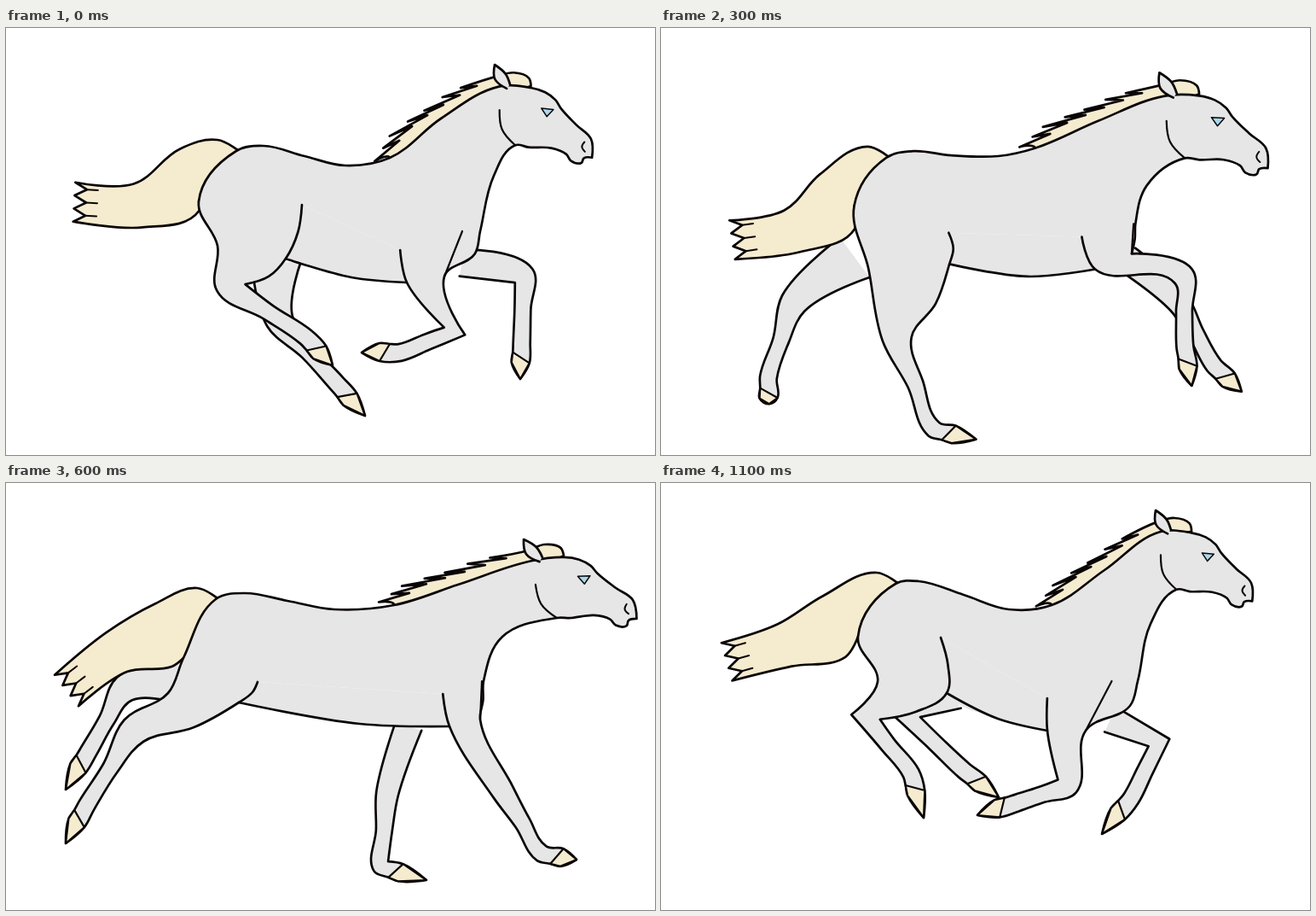
Write an HTML page with a canvas that moves like this. It is 761 px wide and 500 px high and loops after 1200 ms.

```html
<!DOCTYPE html>
<html lang="en">
<head>
<meta charset="utf-8">
<title>Galloping horse</title>
<style>
html, body { margin: 0; width: 100%; height: 100%; overflow: hidden; background: #fff; }
canvas { display: block; }
</style>
</head>
<body>
<canvas id="stage" width="761" height="500"></canvas>
<script>
const ctx = document.getElementById('stage').getContext('2d');
const INK = '#0a0505', COAT = '#e6e6e6', CREAM = '#f5ebcf', EYE = '#a9d8ee';
const STEP = 100, CYCLE = 12;

// Key joints of the gallop; `at` is the step in the cycle.
// head: ear tip, nose.  trunk: buttock, dock, croup, loin, back, withers, crest,
// throat, chest, forearm, elbow, belly, flank, stifle.  tail: spine.
// Legs: upper joint (forearm and elbow serve the near foreleg), knee or hock, coronet, toe.
const poses = [
  { at: 0, head: '573,43 686,130',
    trunk: '226,203 270,144 302,138 350,150 398,161 450,152 510,106 572,173 556,238 514,291 470,298 405,292 328,270 347,207',
    tail: '215,178 155,208 85,204',
    nearHind: '248,255 264,304 364,375 383,395', farHind: '317,275 321,343 400,430 421,454',
    nearFore: '526,355 444,380 417,380', farFore: '535,275 607,290 604,386 603,411' },
  { at: 2, head: '576,42 699,130',
    trunk: '232,195 272,144 300,139 340,145 390,149 440,141 508,109 569,182 556,235 543,269 497,287 430,291 357,277 353,228',
    tail: '212,198 155,228 90,229',
    nearHind: '260,268 332,362 419,463 447,473', farHind: '254,268 195,333 223,462 250,473',
    nearFore: '592,300 561,395 556,417', farFore: '555,262 624,282 665,373 676,396' },
  { at: 4, head: '594,63 720,150',
    trunk: '219,220 255,157 290,147 340,152 400,152 440,142 520,109 572,185 557,225 557,264 518,280 425,290 311,273 318,247',
    tail: '200,203 150,240 85,260',
    nearHind: '221,288 206,352 231,465 260,474', farHind: '208,266 132,305 56,382 30,400',
    nearFore: '620,296 658,392 671,419', farFore: '527,280 573,364 629,445 656,458' },
  { at: 6, head: '607,66 735,137',
    trunk: '208,205 246,136 280,129 330,138 385,148 455,143 530,119 582,180 560,232 556,277 520,285 415,282 273,257 295,233',
    tail: '185,178 130,198 75,240',
    nearHind: '190,246 150,290 86,393 70,422', farHind: '205,232 139,241 88,329 70,359',
    nearFore: '583,362 646,437 669,441', farFore: '472,285 447,364 457,454 493,465' },
  { at: 8, head: '600,56 725,130',
    trunk: '216,185 256,117 290,111 345,128 405,149 462,148 530,116 596,165 552,235 515,291 468,297 385,276 297,240 309,193',
    tail: '185,165 125,180 78,218',
    nearHind: '217,218 168,237 120,339 101,367', farHind: '228,232 200,232 190,334 188,371',
    nearFore: '474,352 470,456 495,465', farFore: '455,290 425,352 348,388 319,401' },
  { at: 10, head: '581,39 703,122',
    trunk: '222,185 266,117 292,114 345,130 397,151 458,149 522,106 582,172 553,245 492,299 443,295 380,272 320,243 321,181',
    tail: '195,160 140,182 68,194',
    nearHind: '239,233 205,258 230,362 228,396', farHind: '290,235 259,266 309,363 325,387',
    nearFore: '452,360 368,404 345,424', farFore: '510,290 519,344 437,393 408,400' },
  { at: 11, head: '580,32 692,117',
    trunk: '231,180 275,118 302,115 355,131 408,148 458,143 520,102 574,165 559,232 498,290 453,290 395,276 335,246 328,181',
    tail: '203,168 145,190 82,208',
    nearHind: '254,233 240,274 298,357 308,392', farHind: '335,240 288,273 370,348 396,368',
    nearFore: '476,355 400,380 371,389', farFore: '527,277 584,304 540,383 517,411' }
];

// The head is rigid: drawn once, then placed by its ear tip and nose.
const head = {
  anchor: '576,42 699,130',
  outline: '582,69 622,69 640,74 653,83 660,93 680,113 699,130 701,153 691,154 688,160 675,158 669,150 650,143 622,143 605,141',
  ear: '592,71 577,60 576,42 590,53 596,66',
  forelock: '580,56 600,51 619,57 622,67 600,76',
  jaw: '584,98 588,122 605,141',
  eye: '636,94 651,95 643,104',
  nostril: '691,134 688,140 692,146'
};

const points = text => text.split(' ').map(p => p.split(',').map(Number));
const parts = Object.keys(poses[0]).filter(k => k !== 'at');
for (const pose of poses) for (const k of parts) pose[k] = points(pose[k]);
for (const k in head) head[k] = points(head[k]);

const add = (p, q, s = 1) => [p[0] + q[0] * s, p[1] + q[1] * s];
const sub = (p, q) => add(p, q, -1);
const mix = (p, q, t = 0.5) => add(p, sub(q, p), t);
const unit = v => { const d = Math.hypot(...v) || 1; return [v[0] / d, v[1] / d]; };
const toward = (p, q) => unit(sub(q, p));
const turn = v => [-v[1], v[0]];
// Direction at q on the way from p to r.
const through = (p, q, r) => unit(add(toward(p, q), toward(q, r)));
// The two edges of a limb at p.
const edges = (p, dir, w) => [add(p, turn(dir), w), add(p, turn(dir), -w)];

function seeded(seed) {
  return () => (seed = seed * 16807 % 2147483647) / 2147483647;
}

// Cubic interpolation between key poses, wrapping round the cycle.
function poseAt(step) {
  const n = poses.length;
  const i = poses.findLastIndex(p => p.at <= step);
  const key = j => poses[(j + n) % n];
  const when = j => key(j).at + CYCLE * Math.floor(j / n);
  const h = when(i + 1) - when(i), u = (step - when(i)) / h;
  const out = {};
  for (const k of parts) {
    out[k] = key(i)[k].map((pt, v) => pt.map((a, c) => {
      const val = j => key(j)[k][v][c];
      const slope = j => (val(j + 1) - val(j - 1)) / (when(j + 1) - when(j - 1)) * h;
      const b = val(i + 1), m = slope(i), q = slope(i + 1);
      return a + u * (m + u * (3 * (b - a) - 2 * m - q + u * (2 * (a - b) + m + q)));
    }));
  }
  return out;
}

// Outline of a lower leg: down the back edge, round the hoof, up the front edge.
function lowerLeg(from, [knee, coronet, toe], width) {
  const u = toward(coronet, toe), n = turn(u);
  const fetlock = add(coronet, u, -18);
  const [kneeB, kneeF] = edges(knee, through(from, knee, fetlock), width);
  const [shinB, shinF] = edges(mix(knee, fetlock), toward(knee, fetlock), 9.5);
  const [fetB, fetF] = edges(fetlock, through(knee, fetlock, coronet), 10);
  const hoofAt = (along, across) => add(add(coronet, u, along), n, across);
  const hoof = [hoofAt(-6, 10), hoofAt(6, 11), toe, hoofAt(6, -10)];
  return { hoof, path: [kneeB, shinB, fetB, ...hoof, fetF, shinF, kneeF] };
}

function farLeg([top, ...joints], topWidth, width) {
  const { hoof, path } = lowerLeg(top, joints, width);
  const [back, front] = edges(top, toward(top, joints[0]), topWidth);
  return { hoof, path: [back, ...path, front] };
}

function tailShape([p1, p2, p3], buttock, dock) {
  const dir = toward(p2, p3);
  const [t1, b1] = edges(p1, through(mix(dock, buttock), p1, p2), 38);
  const [t2, b2] = edges(p2, through(p1, p2, p3), 26);
  const [t3, b3] = edges(p3, dir, 23);
  const tip = [], wisps = [];
  for (let i = 0; i <= 6; i++) {
    const p = add(mix(t3, b3, i / 6), dir, i % 2 ? -9 : 5);
    tip.push(p);
    if (i % 2) wisps.push([p, add(p, dir, -13)]);
  }
  const hump = add(dock, [-22, -13]);
  return { path: [add(dock, [6, 2]), hump, t1, t2, ...tip, b2, b1, buttock], wisps };
}

// Swept-back tufts along the crest, ending in the forelock.
function maneShape(withers, crest, poll, forelock) {
  const rand = seeded(11), tufts = 7, path = [withers];
  const bend = add(add(crest, crest), mix(withers, poll), -1);
  for (let i = 0; i < tufts; i++) {
    const t = i / tufts;
    const a = mix(withers, bend, t), b = mix(bend, poll, t);
    const dir = toward(a, b), out = turn(dir).map(c => -c);
    const root = add(mix(a, b, t), out, Math.min(12, 2 + i * 6));
    const tip = add(add(root, dir, -16 - 14 * rand()), out, 5 + 4 * rand());
    path.push(root, tip);
  }
  return [...path, ...forelock, add(crest, [15, 12])];
}

function placeHead([ear, nose]) {
  const [ear0, nose0] = head.anchor;
  const a = sub(nose0, ear0), b = sub(nose, ear), d = a[0] ** 2 + a[1] ** 2;
  const c = (a[0] * b[0] + a[1] * b[1]) / d, s = (a[0] * b[1] - a[1] * b[0]) / d;
  const place = p => {
    const [x, y] = sub(p, ear0);
    return add(ear, [c * x - s * y, s * x + c * y]);
  };
  return Object.fromEntries(Object.entries(head).map(([k, pts]) => [k, pts.map(place)]));
}

function build(p) {
  const [buttock, dock, croup, loin, back, withers, crest, throat, chest,
    forearm, elbow, belly, flank, stifle] = p.trunk;
  const face = placeHead(p.head);
  const [thigh, ...hindJoints] = p.nearHind;
  const hind = lowerLeg(mix(thigh, flank), hindJoints, 17);
  const shoulder = mix(elbow, forearm);
  const fore = lowerLeg(shoulder, p.nearFore, 13);

  const hock = hind.path.at(-1);
  const gaskin = add(mix(hock, flank), turn(toward(hock, flank)), 7);
  const armDir = toward(shoulder, p.nearFore[0]);
  const elbowTop = add(elbow, [-16 * armDir[0], -38]);
  const outline = [
    stifle, add(mix(stifle, flank), [5, 0]), flank, gaskin,
    ...hind.path.toReversed(), thigh,
    buttock, dock, croup, loin, back, withers, crest, ...face.outline,
    throat, chest, [chest[0] + (forearm[0] - chest[0]) * 0.15, (chest[1] + forearm[1]) / 2],
    forearm, ...fore.path.toReversed(), elbow, elbowTop
  ];
  return {
    face, outline,
    hooves: [hind.hoof, fore.hoof],
    belly: [elbow, belly, flank],
    shoulderLine: [forearm, [(chest[0] + forearm[0]) / 2, chest[1]]],
    underside: [elbowTop, elbow, belly, flank, stifle],
    tail: tailShape(p.tail, buttock, dock),
    mane: maneShape(withers, crest, face.outline[0], face.forelock),
    far: [farLeg(p.farHind, 29, 16), farLeg(p.farFore, 16, 13)]
  };
}

// Smooth curve through the points; sharp turns stay corners.
function curve(pts) {
  const path = new Path2D(), last = pts.length - 1;
  const dir = pts.map((p, i) => {
    if (!i || i === last) return [0, 0];
    const a = toward(pts[i - 1], p), b = toward(p, pts[i + 1]);
    return a[0] * b[0] + a[1] * b[1] < 0.2 ? [0, 0] : unit(add(a, b));
  });
  path.moveTo(...pts[0]);
  for (let i = 1; i <= last; i++) {
    const p = pts[i - 1], q = pts[i], d = Math.hypot(...sub(q, p)) * 0.35;
    path.bezierCurveTo(...add(p, dir[i - 1], d), ...add(q, dir[i], -d), ...q);
  }
  return path;
}

function fill(path, color) {
  ctx.fillStyle = color;
  ctx.fill(path);
}

function line(path, width = 2.7) {
  ctx.lineWidth = width;
  ctx.stroke(path);
}

function shape(pts, color) {
  const path = curve(pts);
  fill(path, color);
  line(path);
}

function polygon(pts, color, width) {
  const path = new Path2D();
  pts.forEach(p => path.lineTo(...p));
  path.closePath();
  fill(path, color);
  line(path, width);
}

function draw(horse) {
  const { face } = horse;
  ctx.fillStyle = '#fff';
  ctx.fillRect(0, 0, 761, 500);
  ctx.strokeStyle = INK;
  ctx.lineJoin = ctx.lineCap = 'round';

  for (const leg of horse.far) {
    shape(leg.path, COAT);
    polygon(leg.hoof, CREAM, 2.2);
  }
  shape(horse.tail.path, CREAM);
  horse.tail.wisps.forEach(w => line(curve(w), 2));
  shape(horse.mane, CREAM);

  fill(curve(horse.underside), COAT);
  shape(horse.outline, COAT);
  line(curve(horse.belly));
  line(curve(horse.shoulderLine), 2.2);
  horse.hooves.forEach(h => polygon(h, CREAM, 2.2));

  shape(face.ear, COAT);
  line(curve(face.jaw), 2.2);
  polygon(face.eye, EYE, 1.5);
  line(curve(face.nostril), 2);
}

const cycle = Array.from({ length: CYCLE }, (_, s) => build(poseAt(s)));
const start = performance.now();
function tick() {
  draw(cycle[Math.floor((performance.now() - start) / STEP) % CYCLE]);
  requestAnimationFrame(tick);
}
tick();
</script>
</body>
</html>
```
